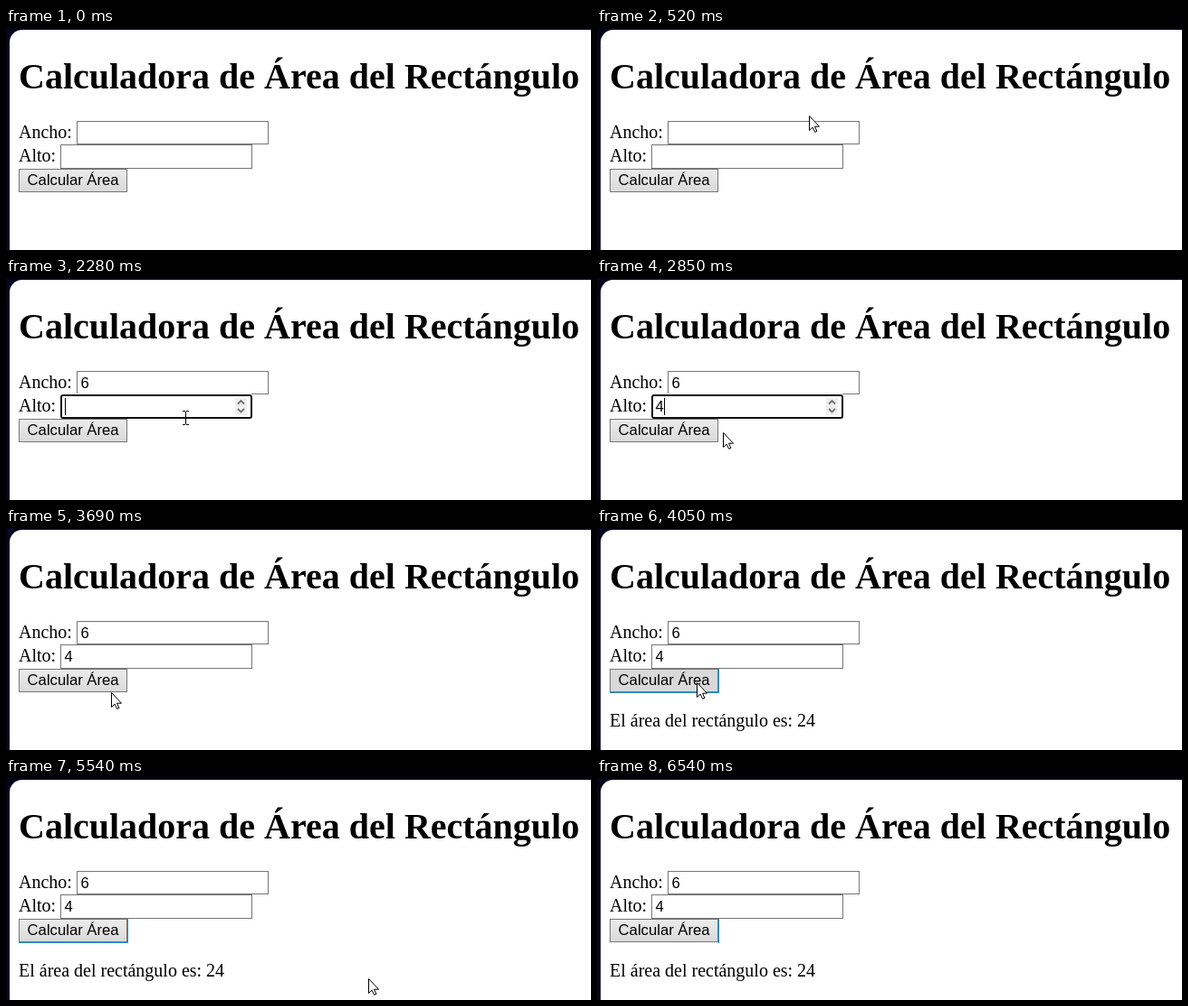
Recreate the animation shown at these times as an HTML page. Size 646 by 246 pixels, loop 6600 ms.

```html
<!DOCTYPE html>
<html lang="es">
<head>
<meta charset="utf-8">
<title>Calculadora de Área del Rectángulo</title>
<style>
  html, body { margin: 0; width: 100%; height: 100%; overflow: hidden; background: #03031a; }
  svg { display: block; }
  text { font: 20px "Liberation Serif", "Times New Roman", serif; }
  .title { font-size: 40px; font-weight: bold; }
  .ui { font: 16.667px "Liberation Sans", Arial, sans-serif; }
  .box { fill: #fff; stroke: #767676; }
  .halo { fill: none; stroke: #fff; stroke-width: 4; }
  .ring { fill: none; stroke: #101010; stroke-width: 2; }
  .spin path { fill: none; stroke: #707070; stroke-width: 1.8; }
</style>
</head>
<body>
<svg width="646" height="246" viewBox="0 0 646 246">
  <defs>
    <linearGradient id="face" x2="0" y2="1">
      <stop stop-color="#ebebeb"/><stop offset="1" stop-color="#dadada"/>
    </linearGradient>
  </defs>
  <path d="M4 246V16A14 14 0 0 1 18 2H646V246Z" fill="#fff"/>
  <text class="title" x="14" y="67">Calculadora de Área del Rectángulo</text>
  <g id="form"></g>
  <rect id="button" x="14.5" y="156.5" width="119" height="25" stroke="#767676"/>
  <text class="ui" x="23.6" y="174">Calcular Área</text>
  <path id="edgeRight" d="M134.5 156V183" stroke="#1c8fc9"/>
  <path id="edgeBottom" d="M14 182.5H135" stroke="#1c8fc9"/>
  <text id="result" x="14" y="220">El área del rectángulo es: 24</text>
  <g id="cursor">
    <path id="arrow" d="M.5 .5V16.5L4.1 13.1 6.6 18.4 8.9 17.4 6.5 12.2H11.5Z" fill="#fff" stroke="#000"/>
    <path id="beam" d="M-3 -7.5H0M1 -7.5H4M.5 -7V7M-3 7.5H0M1 7.5H4" fill="none" stroke="#000"/>
  </g>
</svg>
<script>
const LOOP = 6600, WIDTH = 212, ROW = 26;
const ENTER = 110, EXIT = 5730, PRESS = 3820, RELEASE = 3890;

const $ = id => document.getElementById(id);
const show = (el, on) => el.setAttribute('visibility', on ? 'visible' : 'hidden');

const fields = [
  { label: 'Ancho:', x: 78, value: '6', focus: 920, typed: 1430, blur: 2250 },
  { label: 'Alto:', x: 60, value: '4', focus: 2250, typed: 2540, blur: 3440 }
];

// Each move sets out from where the last one ended
const moves = [
  { from: ENTER, to: 420, x: 309, y: 113 },
  { from: 420, to: 620, x: 210, y: 92 },
  { from: 620, to: 740, x: 200, y: 105 },
  { from: 1450, to: 1960, x: 198, y: 155 },
  { from: 2560, to: 3160, x: 118, y: 177 },
  { from: 3210, to: 3460, x: 116, y: 182 },
  { from: 3690, to: 4050, x: 110, y: 171 },
  { from: 4810, to: 5150, x: 134, y: 186 },
  { from: 5150, to: 5460, x: 374, y: 196 },
  { from: 5460, to: EXIT, x: 424, y: 246 }
];

fields.forEach((f, i) => {
  const g = document.createElementNS('http://www.w3.org/2000/svg', 'g');
  f.y = 103 + ROW * i;
  f.h = ROW + i;
  f.textX = f.x + 4.5;
  const { x, y, h } = f, base = 122 + ROW * i, sx = x + 193;
  const frame = `x="${x + 1}" y="${y + 1}" width="${WIDTH - 2}" height="${h - 2}" rx="2"`;
  g.innerHTML = `
    <text x="14" y="${base}">${f.label}</text>
    <rect class="box" x="${x + .5}" y="${y + .5}" width="${WIDTH - 1}" height="${h - 1}"/>
    <g class="focus"><rect class="halo" ${frame}/><rect class="ring" ${frame}/></g>
    <g class="spin">
      <rect x="${sx}" y="${y + 4}" width="13" height="${h - 8}" fill="#efefef"/>
      <path d="M${sx + 3} ${y + 10.5}l3.5 -3.5 3.5 3.5m-7 5.5l3.5 3.5 3.5 -3.5"/>
    </g>
    <text class="ui" x="${f.textX}" y="${base}">${f.value}</text>
    <rect class="caret" y="${base - 15}" width="1" height="19"/>`;
  $('form').append(g);
  for (const part of ['focus', 'spin', 'ui', 'caret']) f[part + 'El'] = g.querySelector('.' + part);
});

function pointer(t) {
  let x = 560, y = 240;
  for (const m of moves) {
    const k = Math.min(1, Math.max(0, (t - m.from) / (m.to - m.from)));
    const eased = k * (2 - k);
    x += (m.x - x) * eased;
    y += (m.y - y) * eased;
  }
  return [Math.round(x), Math.round(y)];
}

function draw(t) {
  const [px, py] = pointer(t);
  const visible = t >= ENTER && t < EXIT;
  const over = (x, y, w, h) => visible && px >= x && px < x + w && py >= y && py < y + h;
  let onField = false;

  for (const f of fields) {
    const hover = over(f.x, f.y, WIDTH, f.h);
    const active = t >= f.focus && t < f.blur;
    const typed = t >= f.typed;
    const sinceInput = t - (typed ? f.typed : f.focus);
    onField ||= hover;
    show(f.focusEl, active);
    show(f.spinEl, active || hover);
    show(f.caretEl, active && sinceInput % 1000 < 510);
    show(f.uiEl, typed);
    f.caretEl.setAttribute('x', Math.round(f.textX + (typed ? 9 : 0)));
  }

  const pressed = t >= PRESS && t < RELEASE;
  const hot = over(14, 156, 120, 26);
  $('button').setAttribute('fill', pressed ? '#f0f0f0' : hot ? '#d9d9d9' : 'url(#face)');
  show($('edgeRight'), t >= PRESS);
  show($('edgeBottom'), t >= PRESS && t < 6540);
  show($('result'), t >= RELEASE);

  $('cursor').setAttribute('transform', `translate(${px} ${py})`);
  show($('arrow'), visible && !onField);
  show($('beam'), visible && onField);
}

const start = performance.now();
function tick() {
  draw((performance.now() - start) % LOOP);
  requestAnimationFrame(tick);
}
draw(0);
requestAnimationFrame(tick);
</script>
</body>
</html>
```
